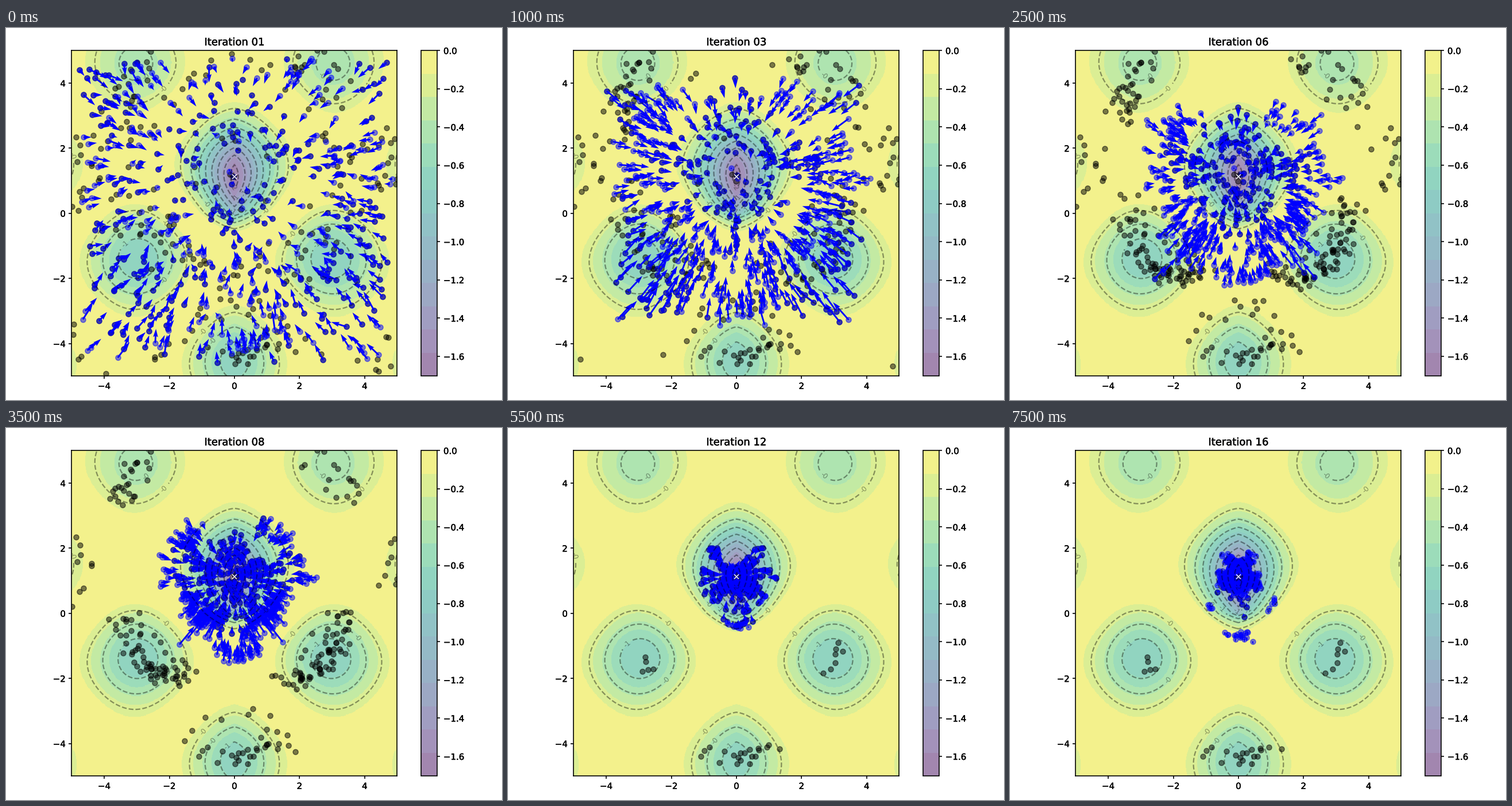
Write a matplotlib script that moves like this. It is 864 by 648 pixels and loops after 8 s.

```python
import matplotlib.pyplot as plt
import numpy as np
from matplotlib import patheffects
from matplotlib.animation import FuncAnimation
from matplotlib.colors import ListedColormap

STEPS = 16
PARTICLES = 500
INERTIA = 0.8
BANDS = 14
MINIMUM = 0, 1.12


def field(x, y):
    return -(np.cos(x) + np.sin(y)) ** 2 / (1 + np.abs(x) + np.abs(y))


def pulls(step):
    """Pull towards a particle's own best and towards the common best."""
    own = 0.05 * (1 - step / 30)
    common = 0.045 + 0.03 * np.cos(2 * np.pi * step / 9)
    return own, common


def swarm():
    """Return (positions, velocities, own bests, common best) per step."""
    np.random.seed(100)
    pos = np.random.rand(2, PARTICLES) * 10 - 5
    vel = np.random.randn(2, PARTICLES) * 0.1
    best = pos.copy()
    lead = best[:, [field(*best).argmin()]]
    states = []
    for step in range(1, STEPS + 1):
        own, common = pulls(step)
        vel = INERTIA * vel + own * (best - pos) + common * (lead - pos)
        pos = pos + vel
        best = np.where(field(*pos) < field(*best), pos, best)
        lead = best[:, [field(*best).argmin()]]
        states.append((pos, vel, best, lead))
    return states


def embolden(texts):
    for text in texts:
        text.set_path_effects(
            [patheffects.withStroke(linewidth=0.3, foreground="black")])


states = swarm()

fig, ax = plt.subplots(figsize=(8, 6), dpi=108, facecolor="white")
fig.set_layout_engine("tight")

# landscape in flat colour bands, with dashed contours
axis = np.linspace(-5, 5, 501)
gx, gy = np.meshgrid(axis, axis)
gz = field(gx, gy)
shades = plt.get_cmap("viridis")((np.arange(BANDS) + 0.5) / BANDS)
img = ax.imshow(gz, extent=(-5, 5, -5, 5), origin="lower", alpha=0.5,
                cmap=ListedColormap(shades), vmin=gz.min(), vmax=0,
                interpolation="nearest")
bar = fig.colorbar(img, ax=ax, ticks=np.arange(-8, 1) / 5)
ax.plot(*MINIMUM, marker="x", markersize=5, color="white")
lines = ax.contour(gx, gy, gz, np.arange(-8, 0) / 5, colors="black",
                   alpha=0.4)
ax.clabel(lines, inline=True, fontsize=8, fmt="%.0f")

pos, vel, best, lead = states[0]
best_dots = ax.scatter(*best, color="black", alpha=0.5)
dots = ax.scatter(*pos, color="blue", alpha=0.5)
arrows = ax.quiver(*pos, *vel, color="blue", width=0.005, angles="xy",
                   scale_units="xy", scale=1)
star = ax.scatter(*lead, marker="*", s=100, color="black", alpha=0.4)

ticks = range(-4, 5, 2)
ax.set(xlim=(-5, 5), ylim=(-5, 5), xticks=ticks, yticks=ticks)
title = ax.set_title("Iteration 01")
embolden([title, *ax.get_xticklabels(), *ax.get_yticklabels(),
          *bar.ax.get_yticklabels()])
for box in (ax, bar.ax):
    box.tick_params(width=1.1)
plt.setp([*ax.spines.values(), bar.outline], linewidth=1.1)


def update(i):
    pos, vel, best, lead = states[i]
    title.set_text(f"Iteration {i + 1:02d}")
    best_dots.set_offsets(best.T)
    dots.set_offsets(pos.T)
    arrows.set_offsets(pos.T)
    arrows.XY = pos.T
    arrows.set_UVC(*vel)
    star.set_offsets(lead.T)
    return title, best_dots, dots, arrows, star


anim = FuncAnimation(fig, update, frames=STEPS, interval=500, repeat=True,
                     repeat_delay=0, blit=False)
plt.show()
```
